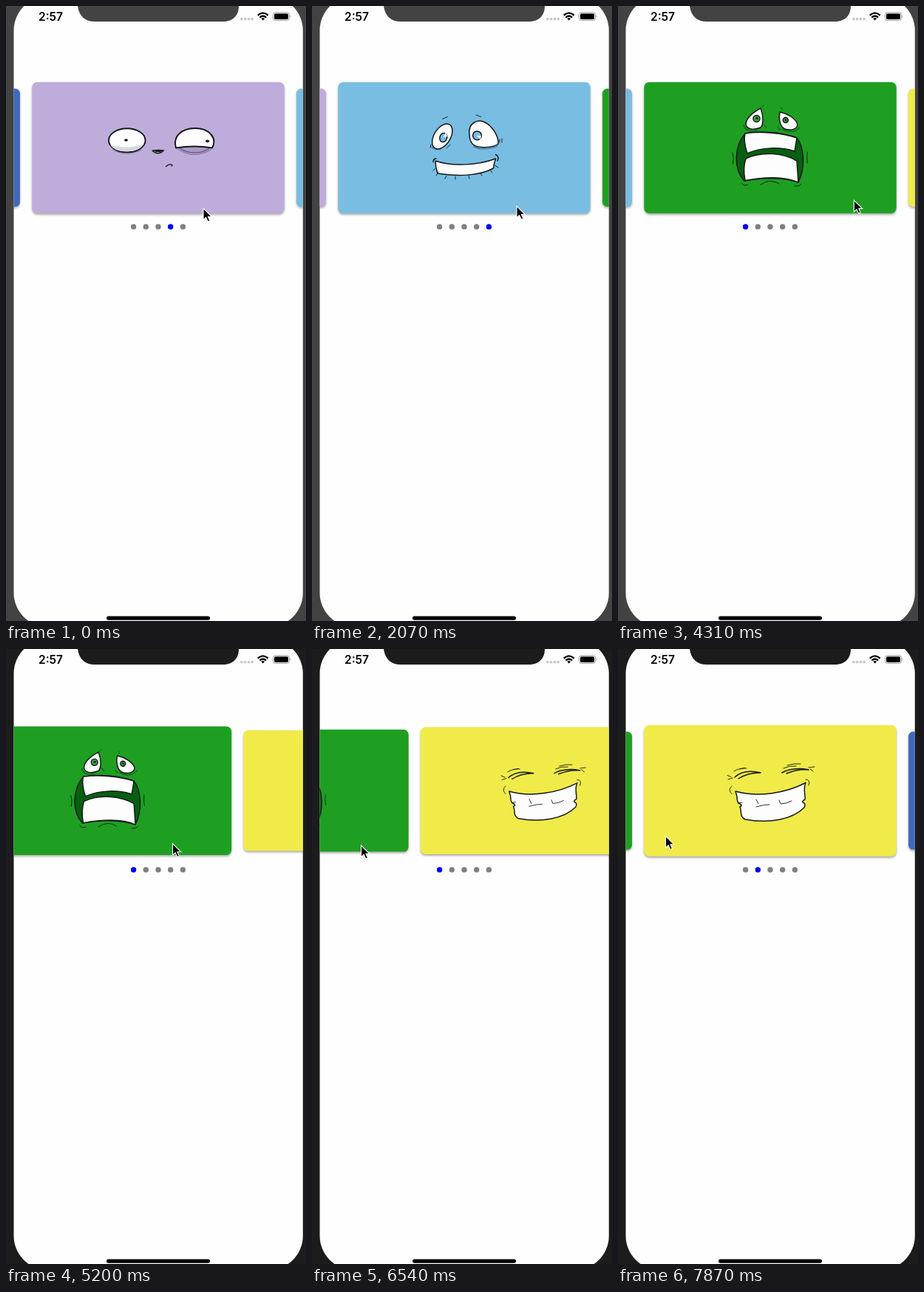
Recreate the animation shown at these times as an HTML page. Size 406x830 px, loop 8000 ms.

```html
<!DOCTYPE html>
<html lang="en">
<head>
<meta charset="utf-8">
<title>Card carousel</title>
<style>
  html, body { margin: 0; height: 100%; overflow: hidden; }
  svg { display: block; width: 406px; height: 830px; }
  .bezel { fill: #434343; }
  .dark .bezel { fill: #1c1c1c; }
  .card { filter: drop-shadow(0 2px 1.8px rgba(0, 0, 0, .34)); }
  .face { fill: none; stroke: #15181c; stroke-width: 1.5; stroke-linecap: round; stroke-linejoin: round; }
  .face .w { fill: #fdfdfd; }
  .face .thin { stroke-width: .9; }
  .face .soft { stroke-width: 1.6; opacity: .4; }
  .face .ink { fill: #15181c; stroke: none; }
  .time { font: 600 15.5px Inter, "Liberation Sans", sans-serif; }
</style>
</head>
<body>
<svg id="stage" viewBox="0 0 406 830">
  <defs>
    <clipPath id="screen"><rect x="10.5" y="-13" width="391.3" height="851" rx="46"/></clipPath>
  </defs>
  <rect class="bezel" width="406" height="830"/>
  <rect x="10.5" y="-13" width="391.3" height="851" rx="46" fill="#fefefe"/>

  <g clip-path="url(#screen)">
    <g class="slide"><rect class="card" fill="#4069bc"/></g>

    <g class="slide">
      <rect class="card" fill="#beaddb"/>
      <g class="face">
        <path class="soft" stroke="#4b3a70" d="M145 194 Q163 204 183 194 M233 193 Q254 207 277 194"/>
        <ellipse class="w" cx="163.8" cy="181.3" rx="24.8" ry="16" stroke-width="1.9"/>
        <path fill="#d9d7dd" stroke="none" d="M141 187 Q163 195 187 186 Q180 197 163 196.500 Q146 196 141 187Z"/>
        <ellipse class="ink" cx="162.5" cy="181" rx="2.4" ry="1.7"/>
        <ellipse cx="255.5" cy="181.5" rx="26.200" ry="16.500" fill="#a99bc4" stroke="#493d60" stroke-width="1"/>
        <path class="w" stroke-width="1.9" d="M230 191.500 C226 178 235 165 256 165 C276 165 286 179 279 191.500 Q255 187.500 230 191.500Z"/>
        <ellipse class="ink" cx="272.600" cy="182.300" rx="2.5" ry="1.900"/>
        <path fill="#c9c2d2" stroke-width="1.3" d="M198 195.200 Q206 193.700 213.500 195 Q206 202.500 198 195.200Z"/>
        <path class="ink" d="M199 194.500 H213 L209 197 H203Z"/>
        <path stroke-width="1.3" d="M216.500 216.500 Q221 212.500 224.500 214 Q225.500 215 224 216"/>
      </g>
    </g>

    <g class="slide">
      <rect class="card" fill="#79bde2"/>
      <g class="face">
        <path class="soft" d="M161 190 Q167 195 175 193 M219 190 Q232 196 251 189 M182 192 L187 187"/>
        <ellipse class="w" cx="176.300" cy="176" rx="11" ry="18.800" transform="rotate(32 176.300 176)"/>
        <ellipse cx="177.800" cy="177.500" rx="4.800" ry="6.200" fill="#79bde2" transform="rotate(20 177.800 177.500)"/>
        <path class="w" d="M213 173 C211 158 224 152 234 157 C244 162 253 176 252 186 C246 191 226 193 218 187 C214 183 213 178 213 173Z"/>
        <circle cx="223.500" cy="174.800" r="5.900" fill="#79bde2"/>
        <path class="w" stroke="none" d="M178 177 L181 170 L183 176Z M223 175 L229 175 L228 180Z"/>
        <path class="thin" d="M176.500 152.500 L183.500 149.500 M222 147 L228.500 149.500 M254 180 V184 M257 179 V184 M161 187 L160 191"/>
        <path class="w" d="M167 209 C190 217 225 215 248.500 206 Q246 213 245.500 219 C225 230 195 230 170 226 Q167 217 167 209Z"/>
        <path d="M164 210.500 Q164 206 168 206 M248.500 200.500 Q254 203 251 209"/>
        <path class="thin" d="M171 224 L168 229 M182 229 L180 233 M194 230 V234 M212 229 L213 233 M228 226 L230 229 M241 221 L244 225 M247 215 L252 218 M167 219 L164 222"/>
      </g>
    </g>

    <g class="slide">
      <rect class="card" fill="#1e9f22"/>
      <g class="face" stroke-width="1.2">
        <path class="soft" d="M170 161 Q174 172 188 168 M222 166 Q236 174 246 164 M197 160 L201 164 M216 163 L219 167"/>
        <path class="w" d="M173 160 C173 152 182 144 193 138 C197 148 197 160 193 164 C186 167 175 168 173 160Z"/>
        <circle cx="187.500" cy="152" r="4.500" fill="#31a83a"/>
        <path class="w" d="M219 143 C217 152 219 163 226 166 C234 168 242 167 243 160 C241 152 229 145 219 143Z"/>
        <circle cx="226.800" cy="154" r="3.500" fill="#31a83a"/>
        <circle class="ink" cx="188" cy="151.500" r="1.600"/>
        <circle class="ink" cx="227" cy="154" r="1.400"/>
        <path class="thin" opacity=".6" d="M195 137 L196.500 134 M222 140 L221 137"/>
        <path fill="#075f10" d="M172 172 C157 190 156 220 171 236 C195 231 225 231 244 238 C254 218 252 190 242 178 C222 170 192 168 172 172Z"/>
        <path class="w" d="M172 172 C192 169 222 171 242 178 L239 196 C220 190 195 190 175 199 C172 190 170 180 172 172Z"/>
        <path class="w" d="M173 206 C195 195 225 199 242 209 L244 238 C225 229 195 231 172 235.500 C170 225 170 215 173 206Z"/>
        <path class="thin" d="M155 198 Q157.500 206 155.500 213 M256 197 Q255 205 256.500 212 M167 239 Q171 244 175.500 241 M193 241 Q206 232 218 240 M239 243 Q245 244 248 240"/>
      </g>
    </g>

    <g class="slide">
      <rect class="card" fill="#f0eb48"/>
      <g class="face">
        <path d="M158 173 C167 165 180 164 193 167 M163 175 C172 169 184 167 193 167 M222 167 C230 162 245 160 258 163 M228 168 C238 164 247 162 257 163"/>
        <path class="thin" d="M157 165 Q165 160 174 161 M165 162 L172 160.500 M229 157 Q238 154 247 155 M224 161 Q232 157 241 158 M148 170.500 L153 172.500 M149 176 L155 174 M258 160 L266 159 M260 162 L264 165 M154 185 Q148 190 154 195.500 M254 176 Q261 176 258 184"/>
        <path class="w" d="M159 192 C190 201 228 194 254 180.500 C250 190 254 196 253 203 Q247 206 252 208 Q254 210 252 214 C236 230 205 236 172 230 C164 226 168 220 165 213 Q170 211 163 208 Q161 205 161 199 Z"/>
        <path class="thin" d="M187 203 L190 209 M187 213 Q197 210 205 210 M218 204 L220 209 Q228 209 235 205 M163 208 L168 207"/>
      </g>
    </g>

    <g class="slide"><rect class="card" fill="#4069bc"/></g>
  </g>

  <g id="dots"></g>

  <path class="bezel" d="M97 -1 V0 C99 14 107 21 120 21 H293 C306 21 315 14 315 0 V-1Z"/>
  <text class="time" x="44" y="19.600">2:57</text>
  <g fill="#c9c9cb">
    <circle cx="318.800" cy="17.600" r="1.900"/><circle cx="323.600" cy="17.600" r="1.900"/>
    <circle cx="328.400" cy="17.600" r="1.900"/><circle cx="333.200" cy="17.600" r="1.900"/>
  </g>
  <g fill="none" stroke="#000" stroke-width="2.300">
    <path d="M340.700 12.600 Q347.700 6.200 354.700 12.600 M343.300 15.500 Q347.700 11.500 352.100 15.500"/>
    <path d="M345.300 17 Q347.700 15 350.100 17 L347.700 19.500Z" fill="#000" stroke="none"/>
  </g>
  <rect x="361.500" y="8.800" width="22" height="10.600" rx="3" fill="none" stroke="#999"/>
  <rect x="363" y="10.300" width="19" height="7.600" rx="1.700"/>
  <path d="M384.600 12.300 Q386.600 14 384.600 15.800Z" fill="#999"/>
  <rect x="136" y="823.500" width="140" height="5.200" rx="2.600"/>
  <path id="cursor" stroke="#fff" stroke-width="1.100" d="M0 0 V15.600 L3.600 12.300 L6.200 18 L8.900 16.900 L6.400 11.300 H11.300Z"/>
</svg>

<script>
const LOOP = 8000, STEP = 149, FIRST = 720;   // the screen refreshes once per STEP
const PITCH = 340.7, CX = 206, CY = 191.2;
const stage = document.getElementById('stage');
const cursor = document.getElementById('cursor');
const dotBox = document.getElementById('dots');
const slides = [...document.querySelectorAll('.slide')];

for (const card of document.querySelectorAll('.card')) {
  const box = { x: 35.3, y: 102.7, width: 341.4, height: 177, rx: 7 };
  for (const key in box) card.setAttribute(key, box[key]);
}
const dots = Array.from({ length: 5 }, (_, i) => {
  const dot = document.createElementNS(stage.namespaceURI, 'circle');
  dot.setAttribute('cx', 172.600 + 16.700 * i);
  dot.setAttribute('cy', 297.900);
  dot.setAttribute('r', 3.700);
  return dotBox.appendChild(dot);
});

const pointer = [
  [1700, 267, 273], [2060, 277, 270], [2900, 277, 270], [3250, 291, 267],
  [3560, 291.5, 267], [4300, 319.5, 262], [4550, 319.5, 262], [5190, 225.5, 262.5],
  [6531, 66.5, 265], [6830, 64, 262], [7270, 86, 252], [7500, 86, 252], [7872, 64.5, 252.5]
];
const drag = [[4600, 0], [5190, .2], [6531, .688], [6830, .95], [7000, 1]];
const pageTurns = [1100, 4100, 7050];

// Linear interpolation through [time, ...values] keys
function track(keys, t) {
  if (t <= keys[0][0]) return keys[0].slice(1);
  const i = keys.findIndex(k => k[0] > t);
  if (i < 0) return keys[keys.length - 1].slice(1);
  const a = keys[i - 1], b = keys[i], u = (t - a[0]) / (b[0] - a[0]);
  return a.slice(1).map((v, j) => v + (b[j + 1] - v) * u);
}

function glide(t, start) {
  const u = Math.min(1, Math.max(0, (t - start) / 420));
  return u * u * (3 - 2 * u);
}

function draw(now) {
  const time = now % LOOP;
  const t = FIRST + STEP * Math.floor((time - FIRST + 4) / STEP);
  const page = glide(t, 640) + glide(t, 3640) + track(drag, t)[0];

  slides.forEach((slide, i) => {
    const off = i - 1 - page, scale = 1 - .1 * Math.min(1, Math.abs(off));
    slide.setAttribute('transform',
      `translate(${CX + off * PITCH} ${CY}) scale(${scale}) translate(${-CX} ${-CY})`);
  });

  const active = (3 + pageTurns.filter(turn => t >= turn).length) % 5;
  dots.forEach((dot, i) => dot.setAttribute('fill', i === active ? '#0000ff' : '#808080'));

  cursor.setAttribute('transform', `translate(${track(pointer, t).join(' ')})`);
  stage.classList.toggle('dark', t >= 4590);
  requestAnimationFrame(() => draw(performance.now()));
}
draw(performance.now());
</script>
</body>
</html>
```
